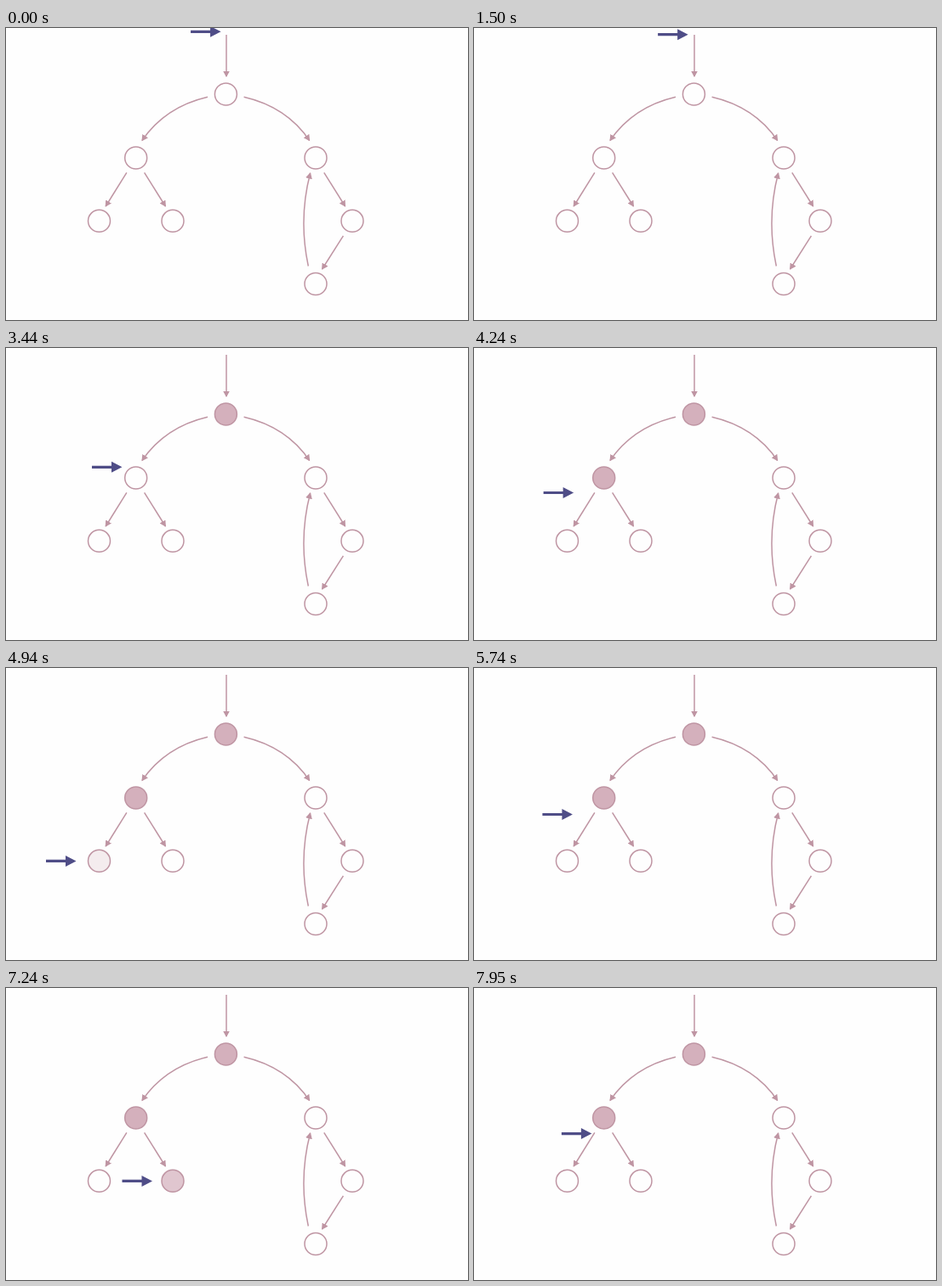
An HTML page that plays this animation: 543 px wide and 344 px high, repeating every 8000 ms.

```html
<!DOCTYPE html>
<html lang="en">
<head>
<meta charset="utf-8">
<title>Depth-first walk</title>
<style>
  html, body { margin: 0; height: 100%; overflow: hidden; background: #fefefe; }
  svg { display: block; width: 543px; height: 344px; }
  .line { fill: none; stroke: #bf95a3; stroke-width: 1.5; }
</style>
</head>
<body>
<svg viewBox="0 0 543 344">
  <marker id="head" markerUnits="userSpaceOnUse" markerWidth="8" markerHeight="8" refX="6.5" refY="4" orient="auto">
    <path d="M0 0L7.5 4L0 8Z" fill="#bf95a3"/>
  </marker>
  <g id="edges"></g>
  <g id="nodes"></g>
  <path id="pointer" d="M0 -1.6H23V-6.5L35.5 0L23 6.5V1.6H0Z" fill="#4f4d87"/>
</svg>
<script>
const LOOP = 8000, STEP = 88.36, START = 1500;

const edges = [
  'M259 8V57',
  'M237 81.3Q187 93 160 132.5',
  'M279.6 81.3Q330 93 356.6 132.5',
  'M141.8 170.3L117.2 210',
  'M162.6 170.3L187.4 210',
  'M373.8 170.3L398.6 210',
  'M396.4 244.8L371.6 284',
  'M355.3 280.5Q343.5 225 357.6 171'
];
const nodes = [[258.4, 78], [152.7, 153], [109.5, 227.3], [196, 227.3],
               [364, 153], [407, 227.3], [364, 301.5]];

// Stops of the pointer's tail
const entry = [217.4, 3.2], root = [198, 72.5], branch = [92, 153.5],
      leftLeaf = [47, 227.4], rightLeaf = [136.5, 227.4];

// Each move eases from one stop to the next; "via" bends the path
const moves = [
  { at: 1320, length: 1000, from: entry, to: root },
  { at: 2520, length: 1180, from: root, to: branch, via: [139, 80.7] },
  { at: 3900, length: 1000, from: branch, to: leftLeaf },
  { at: 5100, length: 1000, from: leftLeaf, to: branch },
  { at: 6100, length: 1000, from: branch, to: rightLeaf },
  { at: 7300, length: 1000, from: rightLeaf, to: branch }
];

// Visited nodes: when the fill begins and, for leaves, when it fades again
const visits = [
  { node: 0, at: 2320 },
  { node: 1, at: 3700 },
  { node: 2, at: 4900, leave: 5100 },
  { node: 3, at: 7100, leave: 7300 }
];

const byId = id => document.getElementById(id);

function add(parent, tag, attributes) {
  const element = document.createElementNS('http://www.w3.org/2000/svg', tag);
  for (const name in attributes) element.setAttribute(name, attributes[name]);
  return byId(parent).appendChild(element);
}

edges.forEach(d => add('edges', 'path', { d, class: 'line', 'marker-end': 'url(#head)' }));
const discs = nodes.map(([cx, cy]) => {
  const disc = add('nodes', 'circle', { cx, cy, r: 13, fill: '#d4b0bc', 'fill-opacity': 0 });
  add('nodes', 'circle', { cx, cy, r: 13, class: 'line' });
  return disc;
});

const progress = (t, at, length) => Math.min(1, Math.max(0, (t - at) / length));
const ease = p => p < 0.5 ? 2 * p * p : 1 - 2 * (1 - p) ** 2;

function pointerAt(t) {
  const { at, length, from, to, via } = moves.filter(move => move.at <= t).pop() || moves[0];
  const p = ease(progress(t, at, length));
  return from.map((a, i) => {
    const middle = via ? via[i] : (a + to[i]) / 2;
    return a * (1 - p) ** 2 + 2 * middle * p * (1 - p) + to[i] * p * p;
  });
}

function draw(now) {
  const time = now % LOOP;
  const step = Math.max(-1, Math.floor((time - START + 16) / STEP));
  const t = START + step * STEP;

  byId('pointer').setAttribute('transform', `translate(${pointerAt(t)})`);
  for (const { node, at, leave = Infinity } of visits) {
    const fade = t < leave ? 0 : progress(t, leave, 500);
    discs[node].setAttribute('fill-opacity', progress(t, at, 200) * (1 - fade));
  }
}

const begin = performance.now();
function frame() {
  draw(performance.now() - begin);
  requestAnimationFrame(frame);
}
frame();
</script>
</body>
</html>
```
